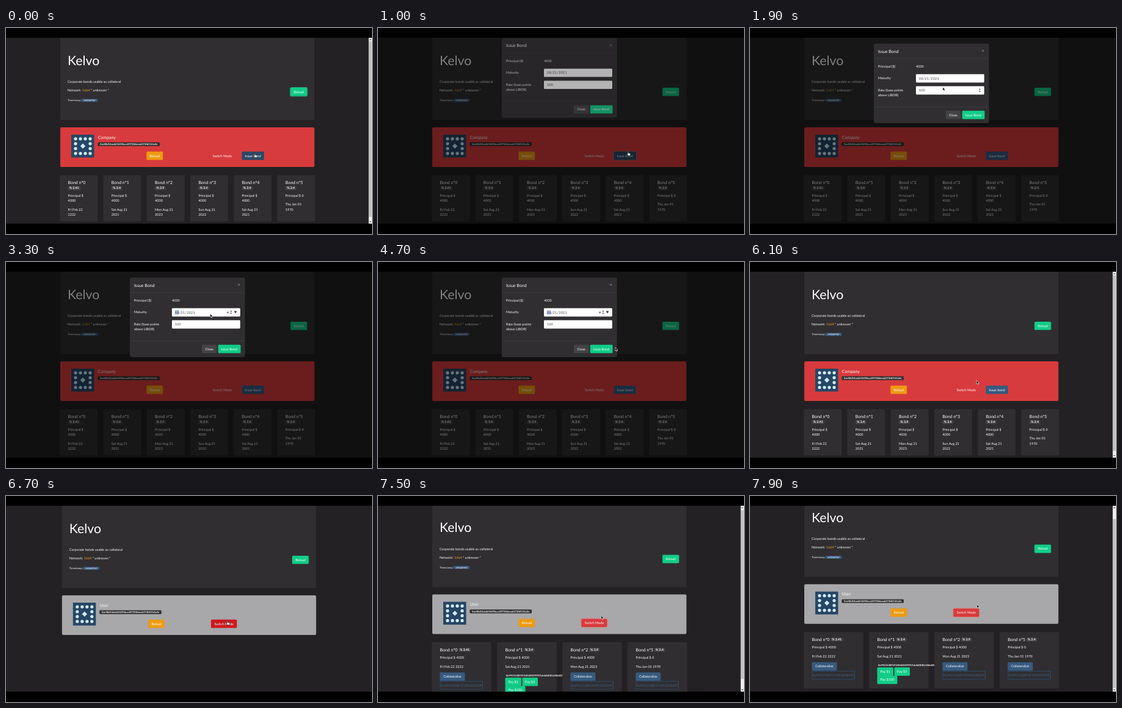
An HTML page for the animation above (8000 ms loop, 600 by 338 pixels).

```html
<!DOCTYPE html>
<html lang="en">
<head>
<meta charset="utf-8">
<title>Bond dashboard</title>
<style>
html, body { margin: 0; width: 100%; height: 100%; overflow: hidden; background: #000; }
svg { display: block; font-family: Lato, sans-serif; text-rendering: geometricPrecision; white-space: pre; }
</style>
</head>
<body>
<svg id="stage" width="600" height="338" viewBox="0 0 600 338"></svg>
<script>
const CARD = '#302e31', GREY = '#444345', BLUE = '#375a7f', GREEN = '#11cd87',
      ORANGE = '#ee9b12', RED = '#d83b3d', DARK_RED = '#cb191f';
const HASH = '0xe58d14aeb24449bccc897206eea6272f6f154a3e';
const OWNER = '0x9921528F1F24f2d3E29f707cb660D81c00dd28b4';

// Markup helpers
const rect = (x, y, w, h, fill, r = 0, more = '') =>
  `<rect x="${x}" y="${y}" width="${w}" height="${h}" rx="${r}" fill="${fill}" ${more}/>`;
const text = (x, y, s, size = 5.5, fill = '#fff', more = '') =>
  `<text x="${x}" y="${y}" font-size="${size}" fill="${fill}" ${more}>${s}</text>`;
const path = (d, fill, more = '') => `<path d="${d}" fill="${fill}" ${more}/>`;
const group = (id, body) => `<g id="${id}">${body}</g>`;
const button = (x, y, w, fill, label, id = '') =>
  rect(x, y, w, 13.6, fill, 1.5, id && `id="${id}"`) +
  text(x + w / 2, y + 8.7, label, 5.5, '#fff', 'text-anchor="middle"');
const badge = (x, y, w, h, fill, label, size) =>
  rect(x, y, w, h, fill, 1.4) +
  text(x + w / 2, y + h / 2 + size * .36, label, size, '#fff', 'text-anchor="middle" font-weight="700"');
const ring = (id, x, y, w, color) =>
  rect(x - .5, y - .5, w + 1, 14.6, 'none', 2, `id="${id}" stroke="${color}" stroke-opacity=".6"`);
const spinner = (x, y) =>
  path(`M${x - 1.5} ${y - 1}h3l-1.5 -2zM${x - 1.5} ${y + 1}h3l-1.5 2z`, '#444');

const bonds = [
  ['2.41', 4000, 'Fri Feb 22', 2222], ['3.4', 4000, 'Sat Aug 21', 2021],
  ['3.9', 4000, 'Mon Aug 21', 2023], ['3.4', 4000, 'Sun Aug 21', 2022],
  ['3.4', 4000, 'Sat Aug 21', 2021], ['2.4', 0, 'Thu Jan 01', 1970]
];
const rateBadge = (x, y, rate) => badge(x, y, rate.length > 3 ? 20.5 : 17.6, 6.4, GREY, '% ' + rate, 5.2);

const companyBonds = bonds.map(([rate, sum, day, year], i) => {
  const x = 88.2 + 71.3 * i, tx = x + 13.3;
  const lines = sum ? ['Principal $', sum] : ['Principal $ 0'];
  const y = 277 + lines.length * 8.4 + 5.7;
  return rect(x, 241.5, 62, 76, CARD, 1.5) + text(tx, 256, 'Bond n°' + i, 7) +
    rateBadge(tx, 259.4, rate) + lines.map((s, k) => text(tx, 277 + 8.4 * k, s)).join('') +
    text(tx, y, day) + text(tx, y + 8.4, year);
}).join('');

const userBonds = [0, 1, 2, 5].map((n, i) => {
  const [rate, sum, day, year] = bonds[n], x = 88.2 + 107 * i, tx = x + 13.3;
  const actions = n === 1
    ? text(tx + 1.5, 297.6, OWNER, 4.1, '#fff', 'font-weight="700"') +
      button(tx, 299.5, 26.4, GREEN, 'Pay $1') + button(tx + 28, 299.5, 25.6, GREEN, 'Pay $5') +
      button(tx, 313, 33, GREEN, 'Pay $100')
    : button(tx, 291, 41, BLUE, 'Collateralize') +
      `<svg x="${tx}" y="305" width="70.4" height="14">` +
      text(1.5, 9, OWNER, 5.5, '#41627f') +
      rect(.4, .4, 69.6, 13.2, 'none', 0, `stroke="#255c8f" stroke-width=".8"`) + '</svg>';
  return rect(x, 241.5, 97.6, 92.5, CARD, 1.5) + text(tx, 256, 'Bond n°' + n, 7) +
    rateBadge(tx + 30.4, 250.6, rate) + text(tx, 268.5, 'Principal $ ' + sum) +
    text(tx, 283, day + ' ' + year) + actions;
}).join('');

let identicon = rect(107, 175, 37.5, 37.5, '#264666') + path('M126 189.6l4.2 4.2l-4.2 4.2l-4.2 -4.2z', '#d2ebf7');
for (let i = 0; i < 16; i++) {
  const c = i % 4, r = i >> 2;
  if (c % 3 === 0 || r % 3 === 0)
    identicon += `<circle cx="${114 + 8 * c}" cy="${181.8 + 8 * r}" r="2.6" fill="#d2ebf7"/>`;
}

const page =
  rect(89, 0, 416.6, 151, CARD, 2) +
  text(101, 60.8, 'Kelvo', 21.3) +
  text(101, 90, 'Corporate bonds usable as collateral') +
  text(101, 104.2, 'Network: <tspan fill="#ee9b12">1664</tspan> " unknown "') +
  text(101, 120, 'Timestamp:', 4.3) + badge(123.3, 116.2, 27, 5, BLUE, '1592287907', 3.4) +
  button(466.3, 98, 27.2, GREEN, 'Reload') + ring('reloadRing', 466.3, 98, 27.2, '#3be3a6') +
  rect(89, 163, 416.6, 65, RED, 2, 'id="account"') + identicon +
  `<text id="role" x="150.8" y="181.6" font-size="7" fill="#fff"></text>` +
  badge(150.4, 187.6, 101.6, 6.2, '#303030', HASH, 4.1) +
  button(230.4, 202.8, 26.8, ORANGE, 'Reload') +
  button(333.3, 202.8, 42.4, RED, 'Switch Mode', 'switch') + ring('switchRing', 333.3, 202.8, 42.4, '#f07a78') +
  group('company', button(386.6, 202.8, 36.4, BLUE, 'Issue bond', 'issue') +
    ring('issueRing', 386.6, 202.8, 36.4, '#5f7fa2') + companyBonds) +
  group('user', userBonds);

const scrollbar = rect(594.6, 16, 5.4, 305, '#f1f1f1') + rect(595, 22, 4.6, 277, '#c1c1c1', 0, 'id="thumb"') +
  path('M595.8 20h3l-1.5 -2zM595.8 317h3l-1.5 2z', '#505050');

const modal =
  rect(203.6, 26.2, 187.6, 129.4, CARD, 2, 'stroke="#454446" stroke-width=".5"') +
  path('M203.6 50H391.2M203.6 129.4H391.2', 'none', 'stroke="#454446" stroke-width=".5"') +
  text(210, 40.6, 'Issue Bond', 7) + text(379.6, 39.8, '×', 8, '#98979a') +
  text(210, 65, 'Principal ($)') + text(272, 65, '4000') +
  text(210, 84.4, 'Maturity') + text(210, 104, 'Rate (base points') + text(210, 112.4, 'above LIBOR)') +
  rect(272, 75.8, 112, 13.6, '#fff', 1.4) + rect(272, 95.6, 112, 13.6, '#fff', 1.4) +
  rect(276.6, 79, 7, 7.4, '#a9cbf0', 0, 'id="selected"') +
  text(277, 84.6, '08/21/2021', 5.5, '#444', 'letter-spacing=".25"') + text(277, 104.4, '100', 5.5, '#444') +
  group('dateTools', text(361.8, 84.9, '×', 6.5, '#223', 'font-weight="700"') + spinner(369, 82.5) +
    path('M373.8 80.6h4.6l-2.3 4z', '#333')) +
  group('rateTools', spinner(376.6, 102.2)) +
  button(321, 135.8, 24.6, GREY, 'Close') + button(347.8, 135.8, 36.8, GREEN, 'Issue Bond');

const outline = 'stroke-width=".6" stroke-linejoin="round"';
const cursor =
  group('arrow', path('M0 0V5.8L1.4 4.6L2.3 6.7L3.3 6.2L2.4 4.3H4.2Z', '#000', 'stroke="#fff" ' + outline)) +
  group('hand', path('M-.6 0Q0 -.6 .6 0V2.2L3.6 3Q4 3.2 3.9 4L3.3 6.6H.2L-2 4Q-1.9 3 -.6 3.9Z', '#fff', 'stroke="#111" ' + outline));

document.getElementById('stage').innerHTML =
  rect(0, 0, 600, 338, '#000') +
  '<svg y="16" width="600" height="305" viewBox="0 16 600 305">' + rect(0, 16, 600, 305, '#232123') +
  group('page', page) + group('scrollbar', scrollbar) +
  rect(0, 16, 600, 305, '#000', 0, 'id="backdrop"') + group('modal', modal) + '</svg>' +
  group('cursor', cursor);

// Animation
const el = id => document.getElementById(id);
const set = (id, name, value) => el(id).setAttribute(name, value);
const show = (id, on) => set(id, 'visibility', on ? 'visible' : 'hidden');
const ramp = (t, from, length) => Math.min(1, Math.max(0, (t - from) / length));
const easeOut = p => 1 - (1 - p) ** 1.7;
const smooth = p => p * p * (3 - 2 * p);

// time, x, y
const track = [
  [0, 408, 206], [700, 408, 206], [1000, 410, 203], [1800, 316, 97], [1950, 316, 97], [2350, 281, 82],
  [3000, 284, 83], [3500, 362, 86], [3900, 374, 83], [4550, 386, 138], [4700, 389, 140], [4850, 415, 137],
  [5300, 417, 136], [5650, 417, 136], [6250, 363, 205], [7350, 363, 205], [7750, 372, 178], [8000, 372, 178]
];
function pointer(t) {
  const i = track.findIndex(k => k[0] > t), a = track[i - 1], b = track[i];
  const p = smooth(ramp(t, a[0], b[0] - a[0]));
  return [a[1] + (b[1] - a[1]) * p, a[2] + (b[2] - a[2]) * p];
}

function draw(t) {
  const isUser = t >= 6600, loaded = t >= 7100;
  const dimmed = t >= 750 && t < 5250;
  const hasBar = !dimmed && (!isUser || loaded);
  const scroll = 18.2 * smooth(ramp(t, 7450, 300));

  set('page', 'transform', `translate(${isUser && !loaded ? 2.8 : 0} ${-scroll})`);
  show('scrollbar', hasBar);
  set('thumb', 'y', 22 + scroll * .88);
  set('thumb', 'height', isUser ? 277 : 288);

  set('account', 'fill', isUser ? '#a8a7a9' : RED);
  el('role').textContent = isUser ? 'User' : 'Company';
  show('company', !isUser);
  show('user', loaded);
  show('reloadRing', t < 700);
  show('issueRing', t >= 700 && t < 1200);
  show('switchRing', t >= 7450);
  set('issue', 'fill', t < 1100 ? '#2c4866' : BLUE);
  set('switch', 'fill', t >= 6200 && t < 7450 ? DARK_RED : RED);

  set('backdrop', 'opacity', .5 * (ramp(t, 750, 150) - ramp(t, 5100, 150)));
  const slide = easeOut(ramp(t, 900, 300)) - easeOut(ramp(t, 4800, 300));
  set('modal', 'opacity', ramp(t, 900, 150) - ramp(t, 4800, 150));
  set('modal', 'transform', `translate(0 ${-18.3 * (1 - slide)})`);
  const modalOn = t > 900 && t < 4950;
  show('modal', modalOn);
  show('selected', modalOn && t >= 2400);
  show('dateTools', modalOn && t >= 2150);
  show('rateTools', modalOn && t >= 1750 && t < 2150);

  const isHand = t < 1050 || t >= 6200 && t < 7500;
  show('hand', isHand);
  show('arrow', !isHand);
  set('cursor', 'transform', `translate(${pointer(t)})`);
}

function frame() {
  draw(performance.now() % 8000);
  requestAnimationFrame(frame);
}
frame();
</script>
</body>
</html>
```
